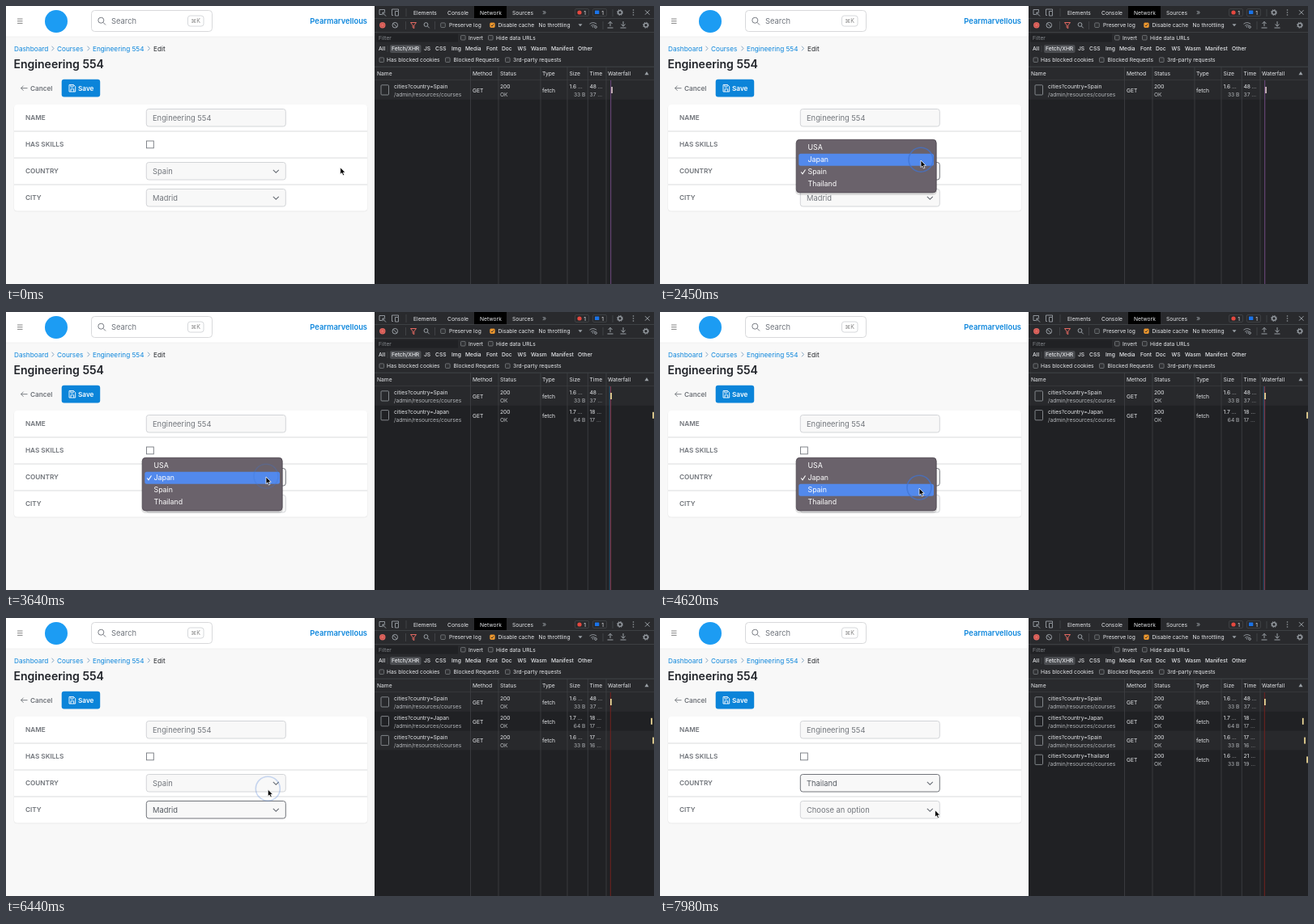
Write an HTML page that moves like this. It is 800x344 px and loops after 8000 ms.

```html
<!DOCTYPE html>
<html lang="en">
<head>
<meta charset="utf-8">
<title>Dependent selects</title>
<style>
  html, body { margin: 0; height: 100%; overflow: hidden; background: #f8f8f8; }
  svg { display: block; width: 100vw; height: 100vh; font-family: Inter, "DejaVu Sans", sans-serif; }
</style>
</head>
<body>
<svg id="stage" viewBox="0 0 800 344"><g id="page"></g><g id="live"></g></svg>
<script>
const LOOP = 8000;
const COUNTRIES = ['USA', 'Japan', 'Spain', 'Thailand'];
const CITIES = ['Choose an option', 'Madrid', 'Valencia', 'Barcelona'];

// Each step list holds [start time, value].
const COUNTRY = [[0, 'Spain'], [2590, 'Japan'], [4760, 'Spain'], [7560, 'Thailand']];
const CITY = [[0, 'Madrid'], [2720, CITIES[0]], [4900, 'Madrid'], [7700, CITIES[0]]];
const REQUEST_COUNT = [[0, 1], [2660, 2], [4830, 3], [7630, 4]];
const FOCUS = [[0, ''], [1330, 'country'], [5370, 'city'], [6600, 'country']];
const POPUPS = [
  { from: 1330, to: 2590, top: 165, items: COUNTRIES, checked: 2 },
  { from: 3430, to: 4760, top: 180, items: COUNTRIES, checked: 1 },
  { from: 5370, to: 6250, top: 213, items: CITIES, checked: 1 },
  { from: 6600, to: 7560, top: 165, items: COUNTRIES, checked: 2 },
];
const CURSOR = [
  [0, 412.7, 199.7], [350, 412.7, 199.7], [1100, 322, 205], [1600, 322, 205], [2150, 322, 191],
  [2650, 322, 191], [3100, 321, 204], [4000, 321, 204], [4400, 320, 218], [4800, 320, 218],
  [5200, 313, 235], [6250, 313, 235], [6520, 326, 206], [6750, 326, 206], [7200, 332, 221],
  [7600, 332, 221], [7900, 339.5, 237.7], [LOOP, 339.5, 237.7],
];
const CLICKS = [1300, 2430, 3400, 4600, 5340, 6200, 6570, 7500];
const REQUESTS = [
  { query: 'Spain', size: ['1.6 …', '33 B'], time: ['48 …', '37 …'] },
  { query: 'Japan', size: ['1.7 …', '64 B'], time: ['18 …', '17 …'] },
  { query: 'Spain', size: ['1.6 …', '33 B'], time: ['17 …', '16 …'] },
  { query: 'Thailand', size: ['1.6 …', '33 B'], time: ['21 …', '19 …'] },
];
const BARS = [[748], [747, 799], [746.8, 797, 799], [746.8, 793.7, 796, 799]];

const rect = (x, y, w, h, fill, extra = '') =>
  `<rect x="${x}" y="${y}" width="${w}" height="${h}" fill="${fill}" ${extra}/>`;
const text = (x, y, size, fill, str, extra = '') =>
  `<text x="${x}" y="${y}" font-size="${size}" fill="${fill}" ${extra}>${str}</text>`;
const line = (d, stroke, width = 1, extra = '') =>
  `<path d="${d}" fill="none" stroke="${stroke}" stroke-width="${width}" ${extra}/>`;
const circle = (x, y, r, fill, extra = '') =>
  `<circle cx="${x}" cy="${y}" r="${r}" fill="${fill}" ${extra}/>`;
const SEMI = 'font-weight="600"';
const MEDIUM = 'font-weight="500"';
const END = 'text-anchor="end"';

const valueAt = (steps, t) => steps.filter(([start]) => start <= t).pop()[1];

function cursorAt(t) {
  const next = CURSOR.findIndex(([time]) => time > t);
  const [t0, x0, y0] = CURSOR[next - 1], [t1, x1, y1] = CURSOR[next];
  const p = (t - t0) / (t1 - t0), ease = p * p * (3 - 2 * p);
  return [x0 + (x1 - x0) * ease, y0 + (y1 - y0) * ease];
}

function adminPage() {
  const blue = '#0c86dc', gray = '#6f7379';
  const chevron = x => line(`M${x} 49.7l2.5 2.8-2.5 2.8`, '#7b9fbd', .9);
  const label = (y, str) => text(24, y, 8.2, gray, str, SEMI);
  return [
    rect(0, 0, 455, 344, '#f8f8f8'), rect(0, 0, 455, 38, '#fff'),
    line('M0 38H455', '#efefef', .8),
    line('M14 16h6.5M14 18.7h6.5M14 21.4h6.5', '#777', .9),
    circle(62, 19, 14, '#1c9cf3'),
    rect(105.5, 5.5, 149, 26, '#fff', 'rx="4" stroke="#d8d9db"'),
    circle(117.3, 17.7, 3.5, 'none', 'stroke="#777b82"'), line('M120 20.4l3 3', '#777b82'),
    text(130, 22, 9.36, '#70757d', 'Search'),
    rect(224.5, 12, 19.5, 13, '#fff', 'rx="3" stroke="#d2d4d7" stroke-width=".9"'),
    text(234.2, 21.3, 7, '#888', '⌘K', 'text-anchor="middle"'),
    text(446, 22, 9.36, blue, 'Pearmarvellous', `${SEMI} ${END}`),
    text(10, 55.5, 8.2, blue, 'Dashboard'), chevron(56.5),
    text(63, 55.5, 8.2, blue, 'Courses'), chevron(100.5),
    text(107, 55.5, 8.2, blue, 'Engineering 554'), chevron(175),
    text(182, 55.5, 8.2, '#24272c', 'Edit'),
    text(9.5, 77, 14.04, '#202329', 'Engineering 554', SEMI),
    line('M26.5 101.7H18.5M21.5 98.7l-3 3 3 3', gray, .9),
    text(30, 104.8, 8.2, gray, 'Cancel', SEMI),
    rect(68.7, 90.7, 47.5, 21.8, '#0b84d9', 'rx="3"'),
    line('M78 97.5h5.5l2.2 2.2v6.3h-7.7zM80 97.5v2.7h3v-2.7M80 106v-3.3h3.7v3.3', '#fff', .9),
    text(89, 104.8, 8.2, '#fff', 'Save', SEMI),
    rect(9.5, 122.5, 437, 132, '#ececec', 'rx="4"'), rect(10, 122, 436, 131.5, '#fff', 'rx="4"'),
    line('M10 155H446M10 188H446M10 221H446', '#d6d7d9', .9),
    label(141.2, 'NAME'), label(174.2, 'HAS SKILLS'), label(207.2, 'COUNTRY'), label(240.2, 'CITY'),
    rect(173.3, 127.5, 172, 21.5, '#f8f8f8', 'rx="3" stroke="#cfd1d4" stroke-width=".9"'),
    text(181, 141.8, 9.36, '#72767c', 'Engineering 554'),
    rect(173.5, 167, 8.8, 8.8, '#fff', 'stroke="#767a80" stroke-width=".9"'),
  ].join('');
}

function devtools() {
  const pale = '#e8eaed', dim = '#9aa0a6', rule = '#47494d';
  const small = (x, y, str, fill = pale, extra = '') => text(x, y, 6.7, fill, str, extra);
  const row = (y, items, extra) => items.map(([x, str]) => small(x, y, str, pale, extra)).join('');
  const box = (x, y, on) => rect(x - 2.8, y - 2.8, 5.6, 5.6, on ? '#f29a2e' : '#303134',
    `rx="1" stroke="${on ? '#f29a2e' : '#85888c'}" stroke-width=".7"`);
  const gear = (x, y) => circle(x, y, 2.4, 'none', `stroke="${dim}" stroke-width="1.3"`) +
    circle(x, y, 3.5, 'none', `stroke="${dim}" stroke-width=".9" stroke-dasharray="1.37 1.37"`);
  const transfer = (x, up) => line(up ? `M${x} 25V19.5M${x - 2.5} 22l2.5-2.7 2.5 2.7` :
    `M${x} 19V25M${x - 2.5} 22.5l2.5 2.7 2.5-2.7`, dim) + line(`M${x - 3.5} 27h7`, dim);
  return [
    rect(455, 0, 345, 344, '#202124'), rect(455, 0, 345, 92, '#292a2d'),
    // Tab bar
    rect(578, 0, 40, 15.5, '#000'),
    line('M464 10.5h-3V4.5h6.5v2.5', dim, .9),
    line('M469 12.5l-4-4.2M465 11.2V8h3.2', dim, 1),
    line('M478 11.5h-1.5V4h8V6M480.5 6.5h4v5.5h-4z', dim, .9),
    line('M494 3v10M493.5 19v10M529.5 19v10M737 19v10M749 4v9', rule, .8),
    row(10.6, [[503, 'Elements'], [545, 'Console'], [585, 'Network'], [625, 'Sources']]),
    text(662, 11, 9, dim, '»'),
    rect(702.5, 3.5, 17, 9, 'none', `rx="1.5" stroke="${rule}" stroke-width=".7"`),
    circle(708, 8, 2.6, '#e5483f'), small(713.3, 10.5, '1'),
    rect(724.5, 3.5, 17, 9, 'none', `rx="1.5" stroke="${rule}" stroke-width=".7"`),
    rect(727, 5.5, 5.3, 4.6, '#1a73e8', 'rx=".6"'), small(735.3, 10.5, '1'),
    gear(758, 8), [5, 8, 11].map(y => circle(774.5, y, .8, dim)).join(''),
    line('M789 5.2l5.5 5.5M794.5 5.2l-5.5 5.5', dim),
    line('M455 15.5H800', rule, .7),
    // Recording toolbar
    circle(464.8, 23.7, 3.7, '#e46962'), circle(464.8, 23.7, 2.2, 'none', 'stroke="#b94b46" stroke-width=".7"'),
    circle(480.3, 23.7, 3.3, 'none', `stroke="${dim}"`), line('M478 21.4l4.6 4.6', dim),
    line('M499.5 20.5h7l-2.7 3.4v3.8l-1.6-1v-2.8z', '#e46962'),
    circle(518.5, 23, 2.4, 'none', `stroke="${dim}"`), line('M520.3 24.8l2.4 2.5', dim),
    box(539.5, 23.7), box(600.5, 23.7, true), line('M598.8 23.8l1.2 1.2 2.2-2.7', '#292a2d', .9),
    row(26.2, [[547, 'Preserve log'], [607.5, 'Disable cache'], [657.5, 'No throttling']]),
    `<path d="M706.5 22.3h5l-2.5 3z" fill="${dim}"/>`,
    line('M720.5 22.2q4.3-3.2 8.6 0M722.2 24.3q2.6-1.8 5.2 0', dim, .9),
    circle(724.5, 25.8, .8, dim), circle(728, 26, 1.4, 'none', `stroke="${dim}" stroke-width=".9"`),
    transfer(746, true), transfer(762, false), gear(790, 23.7),
    line('M455 32.5H800', rule, .7),
    // Filters
    rect(457, 34.5, 101, 10, '#202124'), small(460, 42, 'Filter', '#85898e'),
    box(564.3, 39.2), box(598.3, 39.2), row(41.6, [[571, 'Invert'], [605, 'Hide data URLs']]),
    rect(474, 48, 38.5, 10, '#4b4d51', 'rx="2"'), line('M471 49v8', rule, .7),
    row(55.3, [[460, 'All'], [476, 'Fetch/XHR'], [516, 'JS'], [530, 'CSS'], [550, 'Img'], [567, 'Media'],
      [593, 'Font'], [612, 'Doc'], [631.5, 'WS'], [648, 'Wasm'], [673, 'Manifest'], [706, 'Other']], MEDIUM),
    box(463.8, 66.7), box(545.3, 66.7), box(619.3, 66.7),
    row(69.1, [[470, 'Has blocked cookies'], [552.5, 'Blocked Requests'], [626, '3rd-party requests']]),
    // Table head
    line('M455 75.2H800M455 92H800', rule, .8),
    row(86, [[458, 'Name'], [576, 'Method'], [610, 'Status'], [662, 'Type'], [695.5, 'Size'],
      [720.5, 'Time'], [743, 'Waterfall']]),
    `<path d="M788.5 85.3h5l-2.5-4.2z" fill="${dim}"/>`,
  ].join('');
}

function requestTable(count) {
  const pale = '#e8eaed', dim = '#b4b7bb';
  let out = '';
  REQUESTS.slice(0, count).forEach(({ query, size, time }, i) => {
    const y = 92 + i * 23.8;
    const cell = (x, dy, str, fill = pale, extra = '') => text(x, y + dy, 6.7, fill, str, extra);
    if (i % 2 === 0) out += rect(455, y, 345, 23.8, '#28292c');
    out += rect(463, y + 5.8, 9.5, 12.2, 'none', 'rx="1" stroke="#8c9095" stroke-width=".9"') +
      cell(479, 10, 'cities?country=' + query) + cell(479, 20, '/admin/resources/courses', dim) +
      cell(576, 14.8, 'GET') + cell(610, 10, '200') + cell(610, 20, 'OK', dim) + cell(662, 14.8, 'fetch') +
      cell(695.5, 10, size[0]) + cell(715.5, 20, size[1], dim, END) +
      cell(720.5, 10, time[0]) + cell(720.5, 20, time[1], dim);
  });
  out += line([573.5, 608, 660, 693, 718.3, 741].map(x => `M${x} 75V344`).join(''), '#404246', .8);
  if (count === 1) out += line('M746.7 92V344', '#704a82');
  else if (count === 2) out += line('M745.2 92V344', '#285d80', .9) + line('M746.6 92V344', '#94384f', .9);
  else out += line('M746.3 92V344', '#74221f');
  BARS[count - 1].forEach((x, i) => {
    out += rect(x - .8, 100 + i * 23.8, 1.7, 8, count === 1 ? '#d7c3c7' : '#f2dc9a');
  });
  return out;
}

function select(y, value, focused) {
  return rect(173.3, y, 172, 21.5, '#f8f8f8',
      `rx="3" stroke="${focused ? '#62666c' : '#cfd1d4'}" stroke-width=".9"`) +
    text(181, y + 14.3, 9.36, focused ? '#565b62' : '#72767c', value) +
    line(`M329.8 ${y + 9.3}l3.5 3.4 3.5-3.4`, '#6b7078', 1.1);
}

function popup({ top, items, checked }, pointerY) {
  const hover = Math.floor((pointerY - top - 2.5) / 15);
  let out = rect(167, top + 1, 175, 68, '#000', 'rx="5" opacity=".12"') +
    rect(168.3, top + .3, 172.8, 65.6, '#6a626b', 'rx="4" stroke="#4c464e" stroke-width=".8"');
  items.forEach((item, i) => {
    const mid = top + 10.2 + i * 15;
    if (i === hover) out += rect(171.3, mid - 7.5, 166.7, 15, '#5289ec', 'rx="2.5"');
    if (i === checked) out += line(`M174.2 ${mid + .3}l1.8 2.4 3.5-5.4`, '#fff', 1.1);
    out += text(182.5, mid + 3.1, 8.8, '#fff', item);
  });
  return out;
}

function pointer(t, x, y) {
  const click = CLICKS.find(c => t >= c - 120 && t < c + 380);
  const fade = click === undefined ? 0 : Math.min(1, 1 - (t - click) / 380);
  return circle(x, y - .8, 15, 'none', `stroke="#3f74d2" stroke-width="1.6" opacity="${.75 * fade}"`) +
    `<path transform="translate(${x} ${y}) scale(.85)" d="M0 0V10.2L2.3 8.1 4 11.8 5.8 11 4.2 7.5H7.3Z"
      fill="#000" stroke="#fff" stroke-width=".9"/>`;
}

function draw(t) {
  const [x, y] = cursorAt(t);
  const focus = valueAt(FOCUS, t);
  const open = POPUPS.find(p => t >= p.from && t < p.to);
  document.getElementById('live').innerHTML =
    requestTable(valueAt(REQUEST_COUNT, t)) +
    select(193.5, valueAt(COUNTRY, t), focus === 'country') +
    select(226.5, valueAt(CITY, t), focus === 'city') +
    (open ? popup(open, y) : '') + pointer(t, x, y);
}

document.getElementById('page').innerHTML = adminPage() + devtools();
const start = performance.now();
function tick() {
  draw((performance.now() - start) % LOOP);
  requestAnimationFrame(tick);
}
tick();
</script>
</body>
</html>
```
